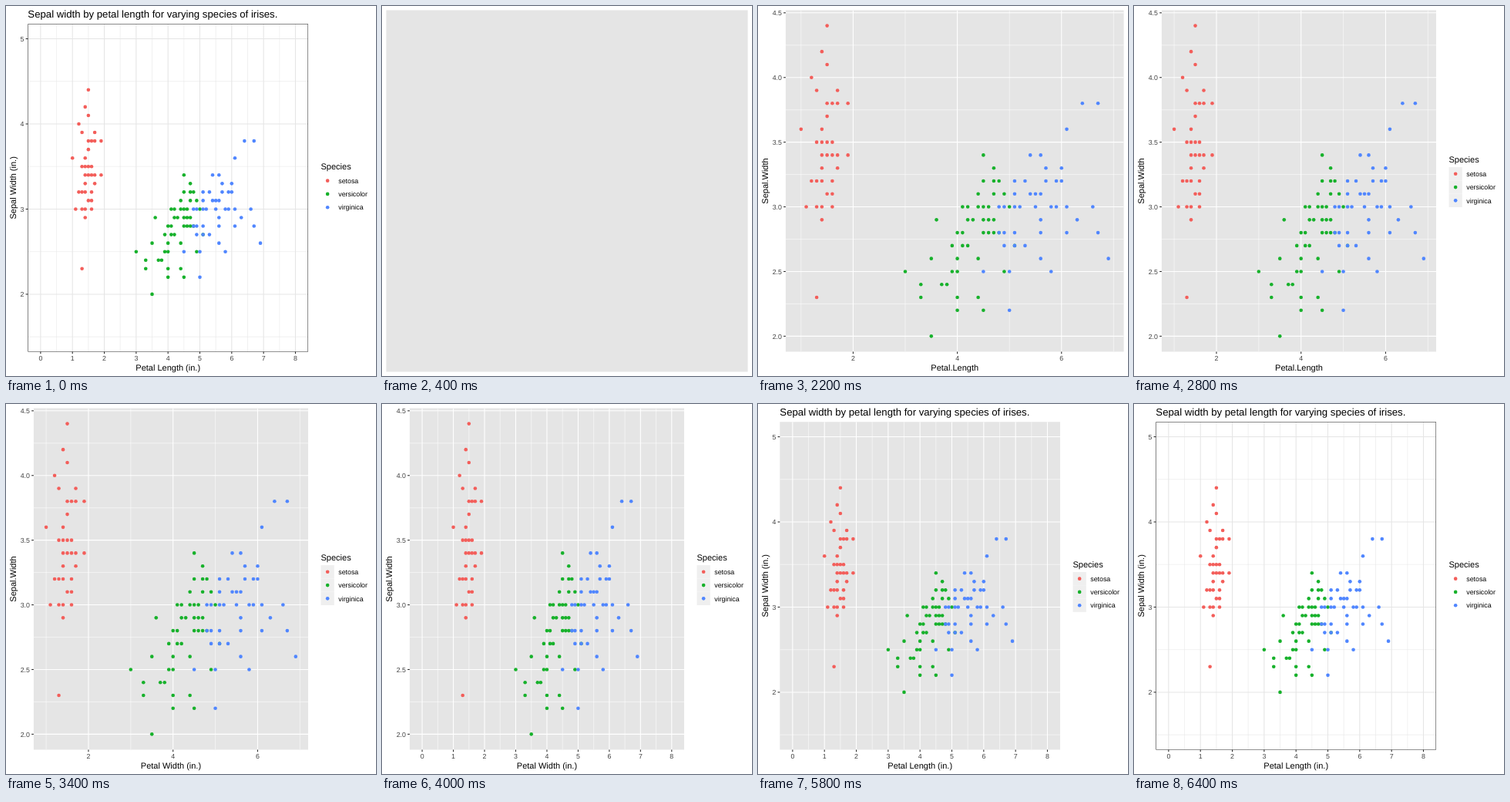
Recreate the animation shown at these times as an HTML page with a canvas. Size 480x480 px, loop 7000 ms.

```html
<!DOCTYPE html>
<html lang="en">
<head>
<meta charset="utf-8">
<title>Building a scatter plot</title>
<style>
html, body { margin: 0; width: 100%; height: 100%; overflow: hidden; background: #fff; }
canvas { display: block; width: 480px; height: 480px; }
</style>
</head>
<body>
<canvas id="plot" width="480" height="480"></canvas>
<script>
const ctx = document.getElementById('plot').getContext('2d');

const LOOP = 7000, LEAD = 400, STEP = 600, LAST = 10;
const SIZE = 480, PAD = 5.48, BOTTOM = 448.5;
const FONT = '"Liberation Sans", Arial, Helvetica, sans-serif';
const GREY = '#e5e5e5', DARK = '#2a2a2a', TICK_TEXT = '#404040';
const MAJOR = 1.07, MINOR = 0.535, TICK = 2.75, DOT = 2.31, KEY = 17.28;

// Rows keyed by sepal width, holding petal lengths, all in tenths.
const species = [
  { name: 'setosa', color: '#f35e5a', rows: {
    44: [15], 42: [14], 41: [15], 40: [12], 39: [13, 17], 38: [15, 16, 17, 19],
    37: [15], 36: [10, 14], 35: [13, 14, 15, 16], 34: [14, 15, 16, 17, 19],
    33: [14, 17], 32: [12, 13, 14, 16], 31: [15, 16], 30: [11, 13, 14, 16],
    29: [14], 23: [13] } },
  { name: 'versicolor', color: '#17b12b', rows: {
    34: [45], 33: [47], 32: [45, 47, 48], 31: [44, 47, 49],
    30: [41, 42, 44, 45, 46, 50], 29: [36, 42, 43, 45, 46, 47],
    28: [40, 41, 45, 46, 47, 48], 27: [39, 41, 42, 51], 26: [35, 40, 44],
    25: [30, 39, 40, 49], 24: [33, 37, 38], 23: [33, 40, 44], 22: [40, 45],
    20: [35] } },
  { name: 'virginica', color: '#5086ff', rows: {
    38: [64, 67], 36: [61], 34: [54, 56], 33: [57, 60], 32: [51, 53, 57, 59, 60],
    31: [51, 54, 55, 56], 30: [48, 49, 51, 52, 55, 58, 59, 61, 66], 29: [56, 63],
    28: [48, 49, 51, 56, 61, 67], 27: [49, 51, 53], 26: [56, 69],
    25: [45, 50, 58], 22: [50] } }
];

// Linear scale with 5% padding on both ends.
function makeScale(min, max, step, from, to) {
  const pad = (max - min) * 0.05, lo = min - pad, hi = max + pad;
  const map = v => from + (v - lo) / (hi - lo) * (to - from);
  const major = [], minor = [];
  for (let i = Math.ceil(lo / step * 2); i * step / 2 <= hi; i++) {
    (i % 2 ? minor : major).push(i * step / 2);
  }
  return { map, major, minor };
}

function text(str, x, y, size, color = '#000', align = 'left') {
  ctx.font = `${size}px ${FONT}`;
  ctx.fillStyle = color;
  ctx.textAlign = align;
  ctx.fillText(str, x, y);
}

function line(x1, y1, x2, y2, color, width) {
  ctx.strokeStyle = color;
  ctx.lineWidth = width;
  ctx.beginPath();
  ctx.moveTo(x1, y1);
  ctx.lineTo(x2, y2);
  ctx.stroke();
}

function dot(x, y, color) {
  ctx.fillStyle = color;
  ctx.beginPath();
  ctx.arc(x, y, DOT, 0, Math.PI * 2);
  ctx.fill();
}

function rect(x, y, w, h, color) {
  ctx.fillStyle = color;
  ctx.fillRect(x, y, w, h);
}

function drawPanel(stage, box, sx, sy) {
  const { left, top, right } = box, w = right - left, h = BOTTOM - top;
  const plain = stage >= 10, gridColor = plain ? GREY : '#fff';
  ctx.save();
  ctx.beginPath();
  ctx.rect(left, top, w, h);
  ctx.clip();
  rect(left - 1, top - 1, w + 2, h + 2, plain ? '#fff' : GREY);
  for (const [kind, width] of [['minor', MINOR], ['major', MAJOR]]) {
    for (const v of sy[kind]) line(left, sy.map(v), right, sy.map(v), gridColor, width);
    for (const v of sx[kind]) line(sx.map(v), top, sx.map(v), BOTTOM, gridColor, width);
  }
  if (stage >= 2) {
    for (const s of species) {
      for (const width in s.rows) {
        for (const length of s.rows[width]) {
          dot(sx.map(length / 10), sy.map(width / 10), stage >= 3 ? s.color : '#000');
        }
      }
    }
  }
  if (plain) {
    ctx.strokeStyle = DARK;
    ctx.lineWidth = MAJOR;
    ctx.strokeRect(left, top, w, h);
  }
  ctx.restore();
}

function drawAxes(stage, box, sx, sy) {
  const { left, top, right } = box;
  for (const v of sx.major) {
    const x = sx.map(v);
    line(x, BOTTOM, x, BOTTOM + TICK, DARK, MAJOR);
    text(String(v), x, 459.8, 8.8, TICK_TEXT, 'center');
  }
  for (const v of sy.major) {
    const y = sy.map(v);
    line(left - TICK, y, left, y, DARK, MAJOR);
    text(stage >= 8 ? String(v) : v.toFixed(1), left - 4.95, y + 3.15, 8.8, TICK_TEXT, 'right');
  }
  const xName = stage >= 7 ? 'Petal Length (in.)' : stage >= 5 ? 'Petal Width (in.)' : 'Petal.Length';
  text(xName, (left + right) / 2, 472.6, 11, '#000', 'center');
  ctx.save();
  ctx.translate(13.3, (top + BOTTOM) / 2);
  ctx.rotate(-Math.PI / 2);
  text(stage >= 7 ? 'Sepal Width (in.)' : 'Sepal.Width', 0, 0, 11, '#000', 'center');
  ctx.restore();
}

function drawLegend(stage, box) {
  const x = box.right + 16.5, mid = (box.top + BOTTOM) / 2;
  text('Species', x, mid - 24, 11);
  species.forEach((s, i) => {
    const y = mid - 9.2 + i * KEY;
    if (stage < 10) rect(x, y - KEY / 2, KEY, KEY, '#efefef');
    dot(x + KEY / 2, y, s.color);
    text(s.name, x + KEY + 5.5, y + 3.15, 8.8);
  });
}

function draw(stage) {
  rect(0, 0, SIZE, SIZE, '#fff');
  if (stage === 0) {
    rect(PAD, PAD, SIZE - 2 * PAD, SIZE - 2 * PAD, GREY);
    return;
  }
  const box = {
    left: stage >= 8 ? 28.35 : 35.9,
    top: stage >= 9 ? 23.2 : PAD,
    right: stage >= 4 ? 392 : SIZE - PAD
  };
  const sx = stage >= 6
    ? makeScale(0, 8, 1, box.left, box.right)
    : makeScale(1, 6.9, 2, box.left, box.right);
  const sy = stage >= 8
    ? makeScale(1.5, 5, 1, BOTTOM, box.top)
    : makeScale(2, 4.4, 0.5, BOTTOM, box.top);
  drawPanel(stage, box, sx, sy);
  drawAxes(stage, box, sx, sy);
  if (stage >= 4) drawLegend(stage, box);
  if (stage >= 9) {
    text('Sepal width by petal length for varying species of irises.', box.left, 15, 13.2);
  }
}

ctx.textRendering = 'geometricPrecision';
const start = performance.now();
let shown = -1;

function tick() {
  const t = (performance.now() - start) % LOOP;
  const stage = t < LEAD ? LAST : Math.min(LAST, Math.floor((t - LEAD) / STEP));
  if (stage !== shown) draw(shown = stage);
  requestAnimationFrame(tick);
}
tick();
</script>
</body>
</html>
```
